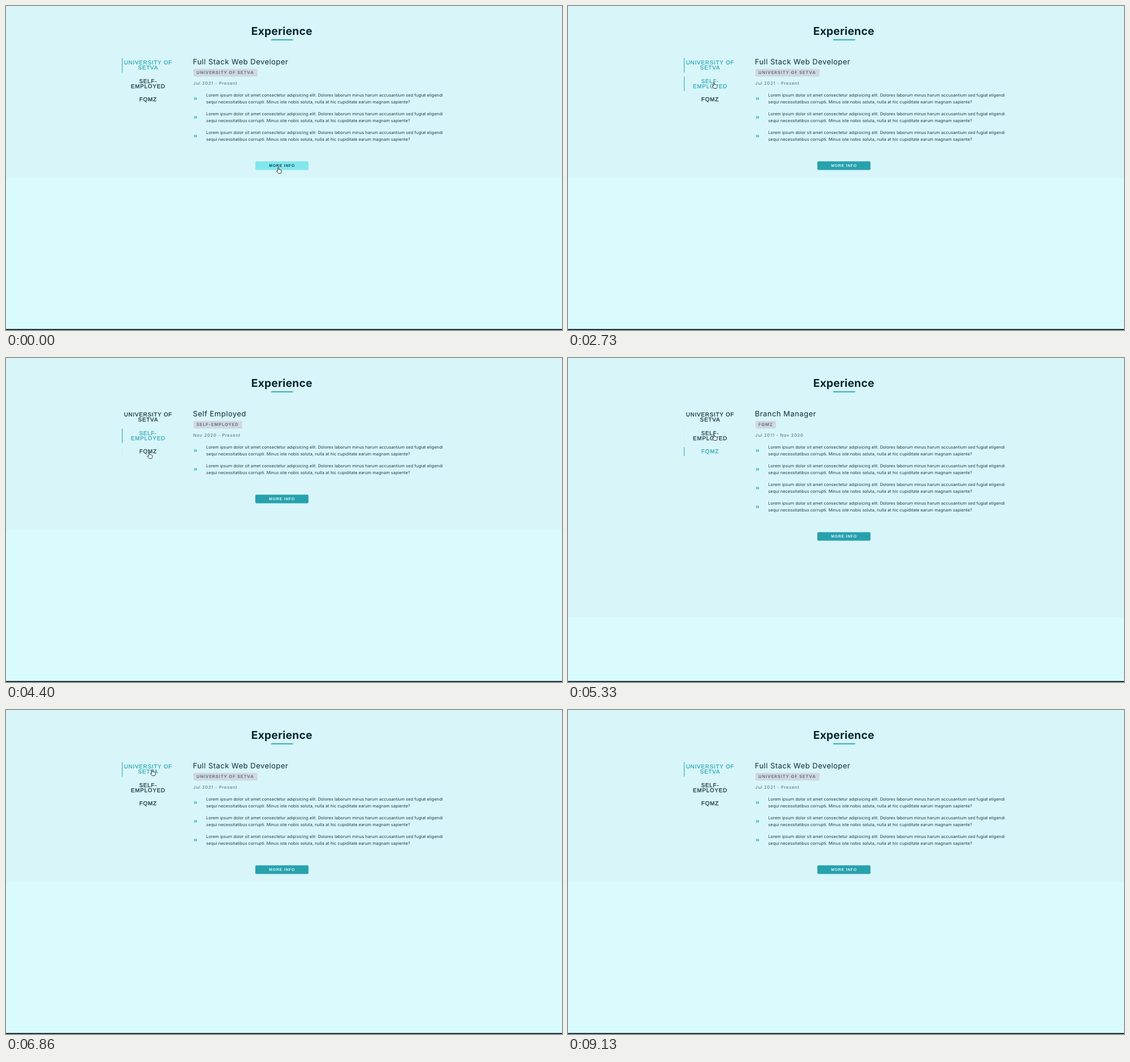
These frames come from a looping animation (979 px wide and 572 px high, 9.93 s). An HTML page:

```html
<!DOCTYPE html>
<html lang="en">
<head>
<meta charset="utf-8">
<title>Experience</title>
<style>
  html, body { margin: 0; width: 100%; height: 100%; overflow: hidden; background: #d9fbfe; }
  svg { display: block; width: 979px; height: 572px; text-rendering: geometricPrecision; }
  text { font-family: Inter, "Liberation Sans", sans-serif; font-optical-sizing: none; }
  .mid { text-anchor: middle; }
  .heading { font-size: 19.2px; font-weight: 700; letter-spacing: .2px; fill: #0a2430; }
  .title { font-size: 13px; letter-spacing: .46px; fill: #10293a; }
  .badge { font-size: 7.5px; font-weight: 700; letter-spacing: .87px; fill: #687784; }
  .date { font-size: 7.5px; font-weight: 500; letter-spacing: .73px; fill: #627a86; }
  .body { font-size: 7.47px; fill: #233f4c; }
  .tab text { font-family: "Liberation Sans", Arial, sans-serif; font-size: 9.8px; letter-spacing: .79px;
    stroke: currentColor; fill: currentColor; stroke-width: .25; }
  .button text { font-family: "Liberation Sans", Arial, sans-serif; font-size: 6.74px; font-weight: 700; letter-spacing: .82px; }
</style>
</head>
<body>
<svg id="stage" viewBox="0 0 979 572"></svg>
<script>
const LOOP = 9930, STEP = 1000 / 15, FADE = 300, ROW = 33.1;
const TEAL = [42, 166, 178], DARK = [20, 42, 52];

const jobs = [
  { title: "Full Stack Web Developer", company: "UNIVERSITY OF SETVA", badge: 113, date: "Jul 2021 - Present", items: 3 },
  { title: "Self Employed", company: "SELF-EMPLOYED", badge: 86, date: "Nov 2020 - Present", items: 2 },
  { title: "Branch Manager", company: "FQMZ", badge: 36, date: "Jul 2011 - Nov 2020", items: 4 }
];

// lit: periods in which a tab is hovered or selected
const tabs = [
  { y: 92, h: 25.5, lines: [["UNIVERSITY OF", 102.6], ["SETVA", 112.2]], lit: [[-1000, 3300], [6180, 20000]] },
  { y: 124.5, h: 25.5, lines: [["SELF-", 135.6], ["EMPLOYED", 145.2]], lit: [[2200, 4800], [5285, 6500]] },
  { y: 157.5, h: 15.5, lines: [["FQMZ", 168.2]], lit: [[4350, 5700]] }
];

const clicks = [[0, 0], [3300, 1], [4800, 2], [5700, 1], [6500, 0]];

// pointer tip: time, x, y
const path = [
  [0, 479.5, 285], [200, 479.5, 285], [900, 290.5, 220.5], [1350, 290.5, 220.5],
  [1900, 300, 150], [2350, 257, 135], [4100, 257, 135], [4400, 252, 167], [5080, 252, 167],
  [5330, 257, 135], [6000, 257, 135], [6260, 257.5, 105.5], [7060, 257.5, 105.5], [7600, 30, 417]
];

const stage = document.getElementById("stage");
const clamp = v => Math.min(1, Math.max(0, v));
const ease = v => v * v * (3 - 2 * v);
const mix = (a, b, k) => a.map((v, i) => v + (b[i] - v) * k);
const rgb = c => `rgb(${c.map(Math.round)})`;
const text = (cls, x, y, s, extra = "") => `<text class="${cls}" x="${x}" y="${y}" ${extra}>${s}</text>`;
const rect = (x, y, w, h, fill, extra = "") => `<rect x="${x}" y="${y}" width="${w}" height="${h}" fill="${fill}" ${extra}/>`;

const glow = (t, periods) => Math.max(...periods.map(([on, off]) =>
  ease(clamp((t - on) / FADE)) * (1 - ease(clamp((t - off) / FADE)))));

function pointerAt(t) {
  const i = path.findIndex(p => p[0] > t);
  if (i < 0) return null;
  const [a, b] = [path[i - 1], path[i]];
  return mix(a, b, ease((t - a[0]) / (b[0] - a[0]))).slice(1);
}

function drawTab(tab, t) {
  const k = glow(t, tab.lit);
  return `<g class="tab" color="${rgb(mix(DARK, TEAL, k))}">` +
    rect(204.1, tab.y, 1.1, tab.h, rgb(TEAL), `opacity="${k}"`) +
    tab.lines.map(([s, y]) => text("mid", 250.3, y, s)).join("") + "</g>";
}

function drawItem(i) {
  const y = 160.1 + i * ROW;
  return `<path d="M331 ${y + 1.2}l2.1 2.2l-2.1 2.2m2.9-4.4l2.1 2.2l-2.1 2.2" fill="none" stroke="${rgb(TEAL)}" stroke-width="1.1"/>` +
    text("body", 352.5, y, "Lorem ipsum dolor sit amet consectetur adipisicing elit. Dolores laborum minus harum accusantium sed fugiat eligendi") +
    text("body", 352.6, y + 11.6, "sequi necessitatibus corrupti. Minus iste nobis soluta, nulla at hic cupiditate earum magnam sapiente?");
}

function drawButton(items, t) {
  const y = 274.3 + (items - 3) * ROW;
  const k = 1 - ease(clamp((t - 270) / FADE));
  return '<g class="button">' +
    rect(439, y, 93.6, 15.2, rgb(mix([40, 161, 174], [128, 231, 237], k)), 'rx="1.8"') +
    text("mid", 486.1, y + 10, "MORE INFO", `fill="${rgb(mix([222, 250, 252], [16, 62, 72], k))}"`) + "</g>";
}

function drawPointer([x, y], active) {
  const overTab = x > 204 && x < 296 && tabs.some(b => y > b.y && y < b.y + b.h);
  const overButton = active === 0 && x > 439 && x < 532.6 && y > 274.3 && y < 289.5;
  const shape = overTab || overButton
    ? '<path d="M-1 5.8V.8Q-1-.2-.1-.2T.8.8V3.8Q2 3.1 2.6 4Q3.8 3.5 4.3 4.4Q5.7 4.2 5.7 5.6V7.4Q5.4 9 4.6 10.4H-.2Q-1.4 8.6-3 6.8Q-3.2 5.2-1 6.6Z" fill="#fff" stroke="#26343c"/>'
    : '<path d="M0 0V8.4L1.9 6.6L3.2 9.6L4.6 9L3.3 6.1H5.9Z" fill="#101418" stroke="#fff" stroke-width=".6" paint-order="stroke"/>';
  return `<g transform="translate(${x} ${y})" stroke-linejoin="round">${shape}</g>`;
}

function draw(now) {
  const t = Math.floor((now % LOOP + 7) / STEP) * STEP;
  const active = clicks.filter(c => c[0] <= t).pop()[1];
  const job = jobs[active];
  const pointer = pointerAt(t);
  stage.innerHTML =
    rect(0, 0, 979, 572, "#d9fbfe") +
    rect(0, 0, 979, job.items > 3 ? 458 : 303, "#d8f6fa") +
    rect(0, 570.3, 979, 1.7, "#081820") +
    text("heading mid", 485.6, 50.6, "Experience") +
    rect(467, 58.7, 38.5, 1.9, rgb(TEAL)) +
    tabs.map(tab => drawTab(tab, t)).join("") +
    text("title", 329, 103.2, job.title) +
    rect(330, 111, job.badge, 13.6, "#d0d8e2", 'rx="1.5"') +
    text("badge", 335.3, 120.2, job.company) +
    text("date", 329.6, 139.1, job.date) +
    Array.from({ length: job.items }, (_, i) => drawItem(i)).join("") +
    drawButton(job.items, t) +
    (pointer ? drawPointer(pointer, active) : "");
}

const start = performance.now();
function tick() {
  draw(performance.now() - start);
  requestAnimationFrame(tick);
}
tick();
</script>
</body>
</html>
```
